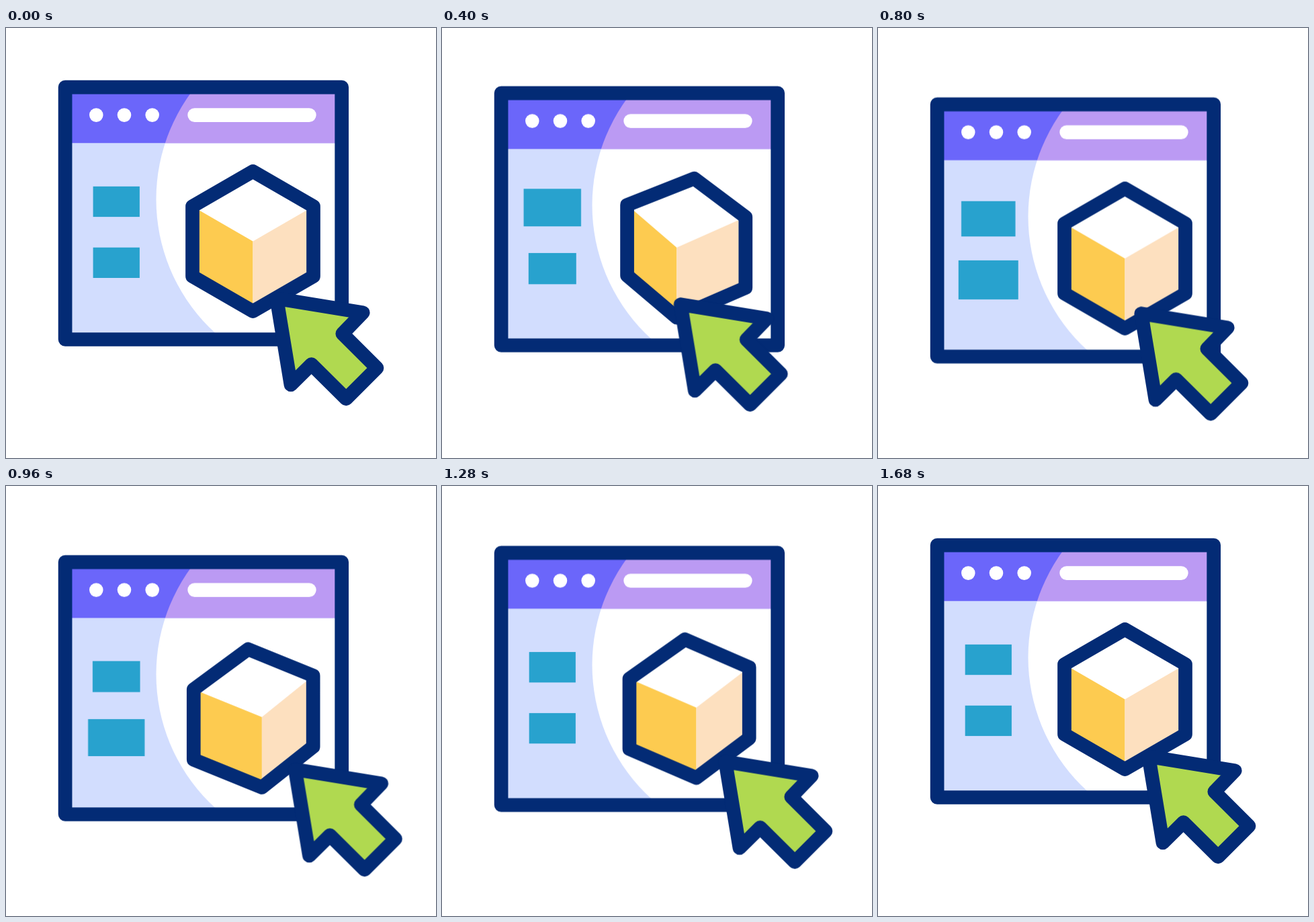
An HTML page that plays this animation: 640 by 640 pixels, repeating every 2 s.

```html
<!DOCTYPE html>
<html lang="en">
<head>
<meta charset="utf-8">
<title>Window with cube</title>
<style>
  html, body { margin: 0; width: 100%; height: 100%; overflow: hidden; background: #fff; }
  svg { display: block; width: 100%; height: 100%; }

  .line { stroke: #032b75; stroke-width: 20.7; stroke-linejoin: round; }

  .scene, .tile, .cursor, .cube path {
    animation: 2s cubic-bezier(.55, 0, .45, 1) infinite;
  }
  .scene { animation-name: bob; }
  .tile { animation-name: grow; transform-box: fill-box; transform-origin: center; }
  .tile + .tile { animation-delay: 210ms; }
  .cursor { animation-name: drag; }
  .cube .shell { animation-name: shell; }
  .cube .left { animation-name: left; }
  .cube .right, .cube .right { animation-name: right; }
  .cube .edge { animation-name: shell; }

  @keyframes bob {
    0%, 3%, 83%, 100% { transform: translateY(0); }
    43% { transform: translateY(25.7px); }
  }
  @keyframes grow {
    0%, 3.5%, 53.5%, 100% { transform: scale(1); }
    28.15% { transform: scale(1.285); }
  }
  @keyframes drag {
    0%, 3%, 76.5%, 100% { transform: translate(0, 0); }
    26.7% { transform: translate(-54.3px, 0); }
    53.4% { transform: translate(32.3px, -6.3px); }
  }

  /* The turn passes through the rest pose at 40.05% without slowing down. */
  @keyframes shell {
    0%, 3%, 40.05%, 76.5%, 100% {
      d: path("M367.5 213.4L457.5 265.4L457.5 369.6L367.5 421.6L277.5 369.6L277.5 265.4Z");
    }
    26.7% {
      d: path("M376.6 215.4L451 273.4L451 379L346.8 422.2L275.3 358.2L275.3 253Z");
      animation-timing-function: cubic-bezier(.55, 0, .775, .5);
    }
    40.05% { animation-timing-function: cubic-bezier(.225, .5, .45, 1); }
    53.4% {
      d: path("M357.4 219.5L457 253.7L457 360.2L386.4 424L280 387.2L280 282.5Z");
    }
  }
  @keyframes left {
    0%, 3%, 40.05%, 76.5%, 100% {
      d: path("M277.5 265.4L367.5 317.5L367.5 421.6L277.5 369.6Z");
    }
    26.7% {
      d: path("M275.3 253L346.8 318L346.8 422.2L275.3 358.2Z");
      animation-timing-function: cubic-bezier(.55, 0, .775, .5);
    }
    40.05% { animation-timing-function: cubic-bezier(.225, .5, .45, 1); }
    53.4% { d: path("M280 282.5L386.4 319.4L386.4 424L280 387.2Z"); }
  }
  @keyframes right {
    0%, 3%, 40.05%, 76.5%, 100% {
      d: path("M367.5 317.5L457.5 265.4L457.5 369.6L367.5 421.6Z");
    }
    26.7% {
      d: path("M346.8 318L451 273.4L451 379L346.8 422.2Z");
      animation-timing-function: cubic-bezier(.55, 0, .775, .5);
    }
    40.05% { animation-timing-function: cubic-bezier(.225, .5, .45, 1); }
    53.4% { d: path("M386.4 319.4L457 253.7L457 360.2L386.4 424Z"); }
  }
</style>
</head>
<body>
<svg viewBox="0 0 640 640">
  <defs>
    <clipPath id="pane"><rect x="88" y="88" width="412" height="375.5"/></clipPath>
  </defs>
  <g class="scene">
    <g clip-path="url(#pane)">
      <rect x="88" y="88" width="412" height="376" fill="#d2ddfe"/>
      <circle cx="492.5" cy="255" r="269" fill="#fff"/>
      <clipPath id="bar"><rect x="88" y="88" width="412" height="83.2"/></clipPath>
      <g clip-path="url(#bar)">
        <rect x="88" y="88" width="412" height="84" fill="#6b66fa"/>
        <circle cx="492.5" cy="255" r="269" fill="#bb9af3"/>
      </g>
    </g>
    <g fill="#fff">
      <circle cx="134.3" cy="129.6" r="10.3"/>
      <circle cx="176" cy="129.6" r="10.3"/>
      <circle cx="217.7" cy="129.6" r="10.3"/>
      <rect x="270.3" y="119.3" width="191.4" height="20.6" rx="10.3"/>
    </g>
    <g fill="#28a2ce">
      <rect class="tile" x="129.6" y="235.8" width="69.3" height="45.3"/>
      <rect class="tile" x="129.6" y="326.7" width="69.3" height="45.3"/>
    </g>
    <rect class="line" x="88.1" y="88.1" width="411.6" height="375.4" fill="none"/>

    <g class="cube">
      <path class="shell" fill="#fff" d="M367.5 213.4L457.5 265.4L457.5 369.6L367.5 421.6L277.5 369.6L277.5 265.4Z"/>
      <path class="left" fill="#fdcb50" d="M277.5 265.4L367.5 317.5L367.5 421.6L277.5 369.6Z"/>
      <path class="right" fill="#fde0bf" d="M367.5 317.5L457.5 265.4L457.5 369.6L367.5 421.6Z"/>
      <path class="edge line" fill="none" d="M367.5 213.4L457.5 265.4L457.5 369.6L367.5 421.6L277.5 369.6L277.5 265.4Z"/>
    </g>

    <path class="cursor line" fill="#b0d950" d="M402.8 402.6L531.2 423.6L500.8 455L552 506L506.3 551.8L454.6 500.6L424 531Z"/>
  </g>
</svg>
</body>
</html>
```
